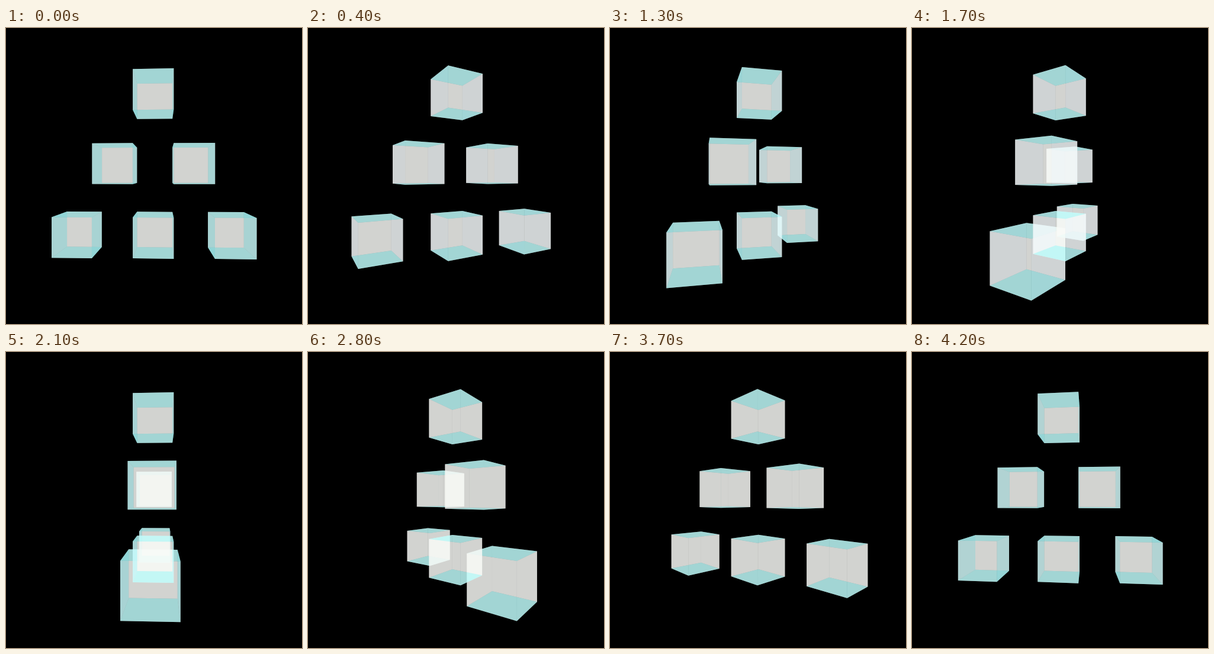
These frames come from a looping animation (500x500 px, 4300 ms). An HTML page with a canvas:

```html
<!DOCTYPE html>
<html>
<head>
<meta charset="utf-8">
<style>
html, body { margin: 0; height: 100%; overflow: hidden; background: #000; }
canvas { display: block; }
</style>
</head>
<body>
<canvas id="stage" width="500" height="500"></canvas>
<script>
const ctx = document.getElementById('stage').getContext('2d');
const LOOP = 4300, STEP = 100;
const FOCAL = 433, CAMERA = 6.746; // lengths are in cube edges
const ALPHA = 0.6;

// [column, height] in drawing order
const CUBES = [[0, -2.116], [1, -0.303], [-1, -0.303], [-2, 1.513], [2, 1.513], [0, 1.513]];

function project([x, y, z]) {
  const scale = FOCAL / (CAMERA - z);
  return [250 + x * scale, 250 + y * scale];
}

function fillFace(points, [r, g, b]) {
  ctx.fillStyle = `rgba(${r},${g},${b},${ALPHA})`;
  ctx.beginPath();
  points.map(project).forEach(([x, y]) => ctx.lineTo(x, y));
  ctx.fill();
}

// Faces turned sideways fall back to cyan, the others are lit nearly white
function sideColor(facing, cool) {
  const r = Math.min(cool ? 245 : 251, 170 + 250 * facing);
  const b = cool ? 255 : 255 - 7 * (r - 170) / 81;
  return [r, 252, b];
}

function drawCube(cx, cy, cz, spin) {
  const corner = (i, y) => {
    const a = spin + Math.PI / 4 + i * Math.PI / 2;
    return [cx + Math.SQRT1_2 * Math.sin(a), cy + y, cz + Math.SQRT1_2 * Math.cos(a)];
  };
  const facing = i => Math.abs(Math.cos(spin + i * Math.PI / 2));
  const order = facing(0) > facing(1) ? [0, 2, 1, 3] : [1, 3, 0, 2];
  order.forEach((i, n) => {
    const cool = n > 1 && Math.sin(spin) > 0;
    fillFace([corner(i - 1, -0.5), corner(i, -0.5), corner(i, 0.5), corner(i - 1, 0.5)],
      sideColor(facing(i), cool));
  });
  for (const y of [-0.5, 0.5]) {
    fillFace([0, 1, 2, 3].map(i => corner(i, y)), [170, 255, 255]);
  }
}

// The turn advances evenly, with two skips
function turnAt(step) {
  return 0.01 * (7 * step - 2 + (step >= 15 ? 10 : 0) + (step >= 34 ? 7 : 0));
}

function draw(now) {
  const turn = turnAt(Math.floor(now % LOOP / STEP));
  ctx.fillStyle = '#000';
  ctx.fillRect(0, 0, 500, 500);
  for (const [column, y] of CUBES) {
    drawCube(column * Math.cos(turn), y, -column * Math.sin(turn), 2 * turn);
  }
  requestAnimationFrame(() => draw(performance.now() - start));
}

const start = performance.now();
draw(0);
</script>
</body>
</html>
```
